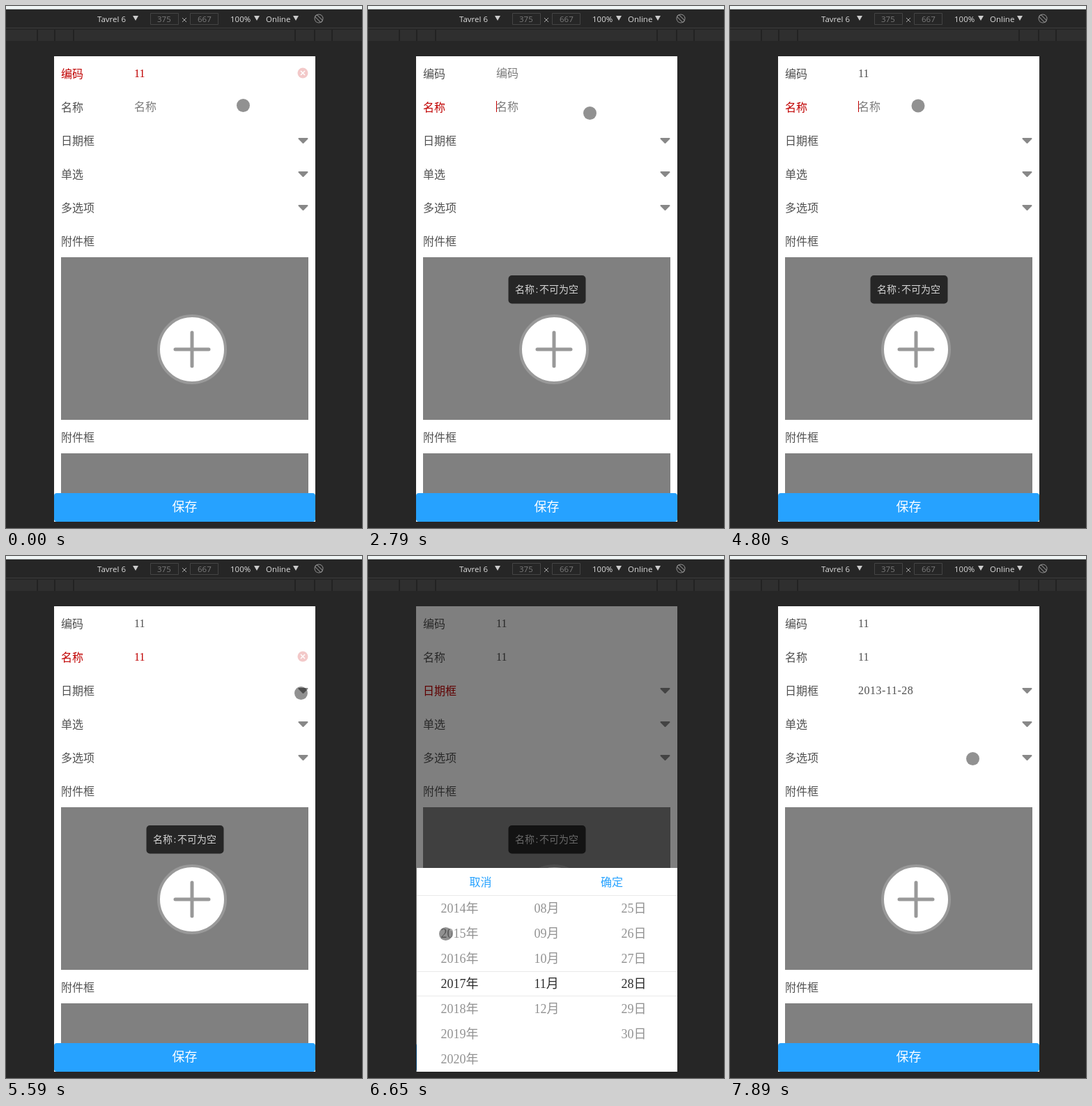
These frames come from a looping animation (511x748 px, 8000 ms). An HTML page:

```html
<!DOCTYPE html>
<html lang="zh-CN">
<head>
<meta charset="utf-8">
<style>
html, body { margin: 0; width: 100%; height: 100%; overflow: hidden; background: #262626; }
svg { display: block; font: 16px 'Liberation Serif', 'Noto Sans CJK SC', 'Noto Sans CJK', serif; }
text { white-space: pre; }
.bar { font: 11.5px 'Open Sans', 'Noto Sans', sans-serif; fill: #ddd; }
.dim { fill: #7b7b7b; }
.wheel { font-size: 18px; }
</style>
</head>
<body>
<svg width="511" height="748" viewBox="0 0 511 748">
  <defs>
    <clipPath id="screen"><rect x="69" y="72" width="375" height="667"/></clipPath>
    <clipPath id="wheels"><rect x="70" y="487" width="374" height="252"/></clipPath>
    <path id="arrow" d="M-6 -3H6L0 3Z" fill="#888" stroke="#888" stroke-width="2" stroke-linejoin="round"/>
    <g id="clear">
      <circle r="7.5" fill="#f3c9c9"/>
      <path d="M-3-3L3 3M3-3L-3 3" stroke="#fff" stroke-width="1.5"/>
    </g>
  </defs>

  <rect width="511" height="748" fill="#262626"/>
  <rect width="511" height="5" fill="#f0f5f5"/>
  <rect y="4" width="511" height="1" fill="#b9bdbd"/>
  <rect y="31" width="511" height="1" fill="#3d3d3d"/>
  <rect y="34" width="511" height="16" fill="#2f2f2f"/>
  <path d="M45 34v16M70 34v16M97 34v16M415 34v16M443 34v16M468 34v16" stroke="#222" stroke-width="2"/>
  <g class="bar">
    <text x="131" y="23">Tavrel 6</text>
    <text x="322" y="23">100%</text>
    <text x="373" y="23">Online</text>
    <text x="217" y="23" class="dim">375</text>
    <text x="275" y="23" class="dim">667</text>
    <path d="M182 14h8l-4 7zM356 14h8l-4 7zM412 14h8l-4 7z" fill="#ccc"/>
  </g>
  <path d="M207.5 10.5h40v16h-40zM264.5 10.5h40v16h-40z" fill="none" stroke="#444"/>
  <path d="M253 17l6 6M259 17l-6 6" stroke="#aaa"/>
  <g transform="translate(449 18) rotate(-45)" fill="none" stroke="#8c8c8c">
    <circle r="6"/>
    <rect x="-2" y="-6" width="4" height="12" rx="1"/>
  </g>

  <g clip-path="url(#screen)">
    <rect x="69" y="72" width="375" height="667" fill="#fff"/>
    <g id="form"></g>
    <path d="M79 360h355v233H79zM79 641h355v57H79z" fill="#808080"/>
    <circle cx="267" cy="492" r="48" fill="#fff" stroke="#999" stroke-width="4"/>
    <path d="M243 492h48M267 468v48" stroke="#999" stroke-width="5" stroke-linecap="round"/>
    <rect x="69" y="698" width="375" height="41" rx="4" fill="#26a2ff"/>
    <text x="238.5" y="724" font-size="18" fill="#fff">保存</text>
    <g id="toast">
      <rect x="201.5" y="386" width="111" height="40.5" rx="5" opacity=".7"/>
      <text x="211" y="411" font-size="14" fill="#d4d4d4">名称<tspan dx="1.5">:</tspan><tspan dx="1.5">不可为空</tspan></text>
    </g>
    <rect id="mask" x="69" y="72" width="375" height="667"/>
    <g id="picker">
      <rect x="70" y="447" width="374" height="292" fill="#fff"/>
      <text x="145.5" y="473" fill="#26a2ff">取消</text>
      <text x="334" y="473" fill="#26a2ff">确定</text>
      <path d="M70 486.5h374M70 595.5h374M70 630.5h374" stroke="#eaeaea"/>
      <g id="columns" class="wheel" clip-path="url(#wheels)"></g>
    </g>
  </g>
  <circle id="touch" r="9.5" fill="#000" fill-opacity=".43"/>
</svg>
<script>
const LOOP = 8000, ROW = 48, STEP = 36;
const RED = '#c00000', INK = '#505050', HINT = '#7c7c7c';
const $ = id => document.getElementById(id);
const set = (el, k, v) => el.setAttribute(k, v);
const show = (el, on) => set(el, 'visibility', on ? 'visible' : 'hidden');
const ramp = (t, start, length) => Math.min(1, Math.max(0, (t - start) / length));
const ease = p => p * p * (3 - 2 * p);

function add(parent, tag, attrs, text = '') {
  const el = document.createElementNS('http://www.w3.org/2000/svg', tag);
  for (const k in attrs) set(el, k, attrs[k]);
  el.textContent = text;
  return parent.appendChild(el);
}

// Form rows
const form = $('form');
const labels = ['编码', '名称', '日期框', '单选', '多选项', '附件框', '附件框'].map((s, i) =>
  add(form, 'text', { x: 79, y: i < 6 ? 103 + ROW * i : 624 }, s));
const hints = ['编码', '名称', ''];
const fields = hints.map((_, i) => add(form, 'text', { x: 184, y: 102 + ROW * i }));
set(fields[2], 'letter-spacing', .53);
const icon = (name, x, y) => add(form, 'use', { href: name, transform: `translate(${x} ${y})` });
const clears = [0, 1].map(i => icon('#clear', 426, 96 + ROW * i));
[2, 3, 4].forEach(i => icon('#arrow', 426.5, 97 + ROW * i));
const caret = add(form, 'rect', { width: 1, height: 16, fill: RED });

// Picker wheels; returns a function that turns one to a value
function wheel(x, first, last, unit) {
  const g = add($('columns'), 'g', {});
  const rows = [];
  for (let v = first; v <= last; v++)
    rows.push(add(g, 'text', { x, y: 619 + STEP * (v - first) }, String(v).padStart(2, '0') + unit));
  return value => {
    set(g, 'transform', `translate(0 ${-STEP * (value - first)})`);
    rows.forEach((r, i) => set(r, 'fill', Math.abs(first + i - value) < .5 ? '#2c2c2c' : '#929292'));
  };
}
const setYear = wheel(104.5, 2000, 2030, '年');
wheel(238.5, 1, 12, '月')(11);
wheel(363.5, 1, 30, '日')(28);

// What the user does, replayed up to the current time
const script = [
  [0, 'focus', 0], [300, 'focus', 1], [700, 'focus', 0], [1700, 'clear'],
  [2780, 'focus', 1], [4000, 'focus', 0], [4120, 'type'], [4270, 'type'],
  [4600, 'focus', 1], [4900, 'type'], [5050, 'type'], [5870, 'focus', 2], [7500, 'confirm']
];
function stateAt(t) {
  const s = { values: ['11', '', ''], focus: 0, last: -LOOP, toast: 0, open: 0 };
  for (const [time, action, row] of script.filter(e => e[0] <= t)) {
    const age = t - time;
    if (action === 'focus') {
      // Leaving the empty name raises a toast for three seconds
      if (s.focus === 1 && !s.values[1]) s.toast += ramp(age, 70, 160) - ramp(age, 2970, 160);
      if (row === 2) s.open = ease(ramp(age, 30, 220));
      s.focus = row;
    } else if (action === 'clear') {
      s.values[s.focus] = '';
    } else if (action === 'type') {
      s.values[s.focus] += '1';
    } else {
      s.values[2] = '2013-11-28';
      s.open -= ease(ramp(age, 0, 220));
      s.focus = -1;
    }
    if (time) s.last = time;
  }
  return s;
}

// Pointer stops: [arrival, x, y]
const TRAVEL = 350, DRAG_END = 7070;
const stops = [
  [0, 340.5, 142.5], [650, 352, 294], [1210, 389.5, 173.5], [1450, 427, 96],
  [2360, 318.5, 153.5], [4150, 263.5, 111.5], [4600, 270, 143], [5290, 435, 185],
  [5590, 423.5, 196.5], [6650, 111.5, 541.5], [DRAG_END, 118, 541.5 + 4 * STEP],
  [7220, 350, 467], [7890, 348.5, 290.5]
];
function touchAt(t) {
  let [last, x, y] = stops[0];
  for (const [arrive, nx, ny] of stops.slice(1)) {
    const length = Math.min(TRAVEL, arrive - last);
    const p = ease(ramp(t, arrive - length, length));
    x += (nx - x) * p;
    y += (ny - y) * p;
    last = arrive;
  }
  return [x, y];
}

function draw(t) {
  const { values, focus, last, toast, open } = stateAt(t);
  labels.forEach((l, i) => set(l, 'fill', i === focus ? RED : INK));
  fields.forEach((f, i) => {
    f.textContent = values[i] || hints[i];
    set(f, 'fill', !values[i] ? HINT : i === focus ? RED : INK);
  });
  clears.forEach((c, i) => show(c, i === focus && values[i]));

  const typing = focus === 0 || focus === 1;
  show(caret, typing && t - last < 500);
  if (typing) {
    set(caret, 'x', 184 + 8.5 * values[focus].length);
    set(caret, 'y', 88 + ROW * focus);
  }

  set($('toast'), 'opacity', toast);
  set($('mask'), 'opacity', open / 2);
  set($('picker'), 'transform', `translate(0 ${292 * (1 - open)})`);
  setYear(2017 - 4 * ease(ramp(t, DRAG_END - TRAVEL, TRAVEL)));

  const [x, y] = touchAt(t);
  set($('touch'), 'cx', x);
  set($('touch'), 'cy', y);
}

function tick() {
  draw(performance.now() % LOOP);
  requestAnimationFrame(tick);
}
tick();
</script>
</body>
</html>
```
